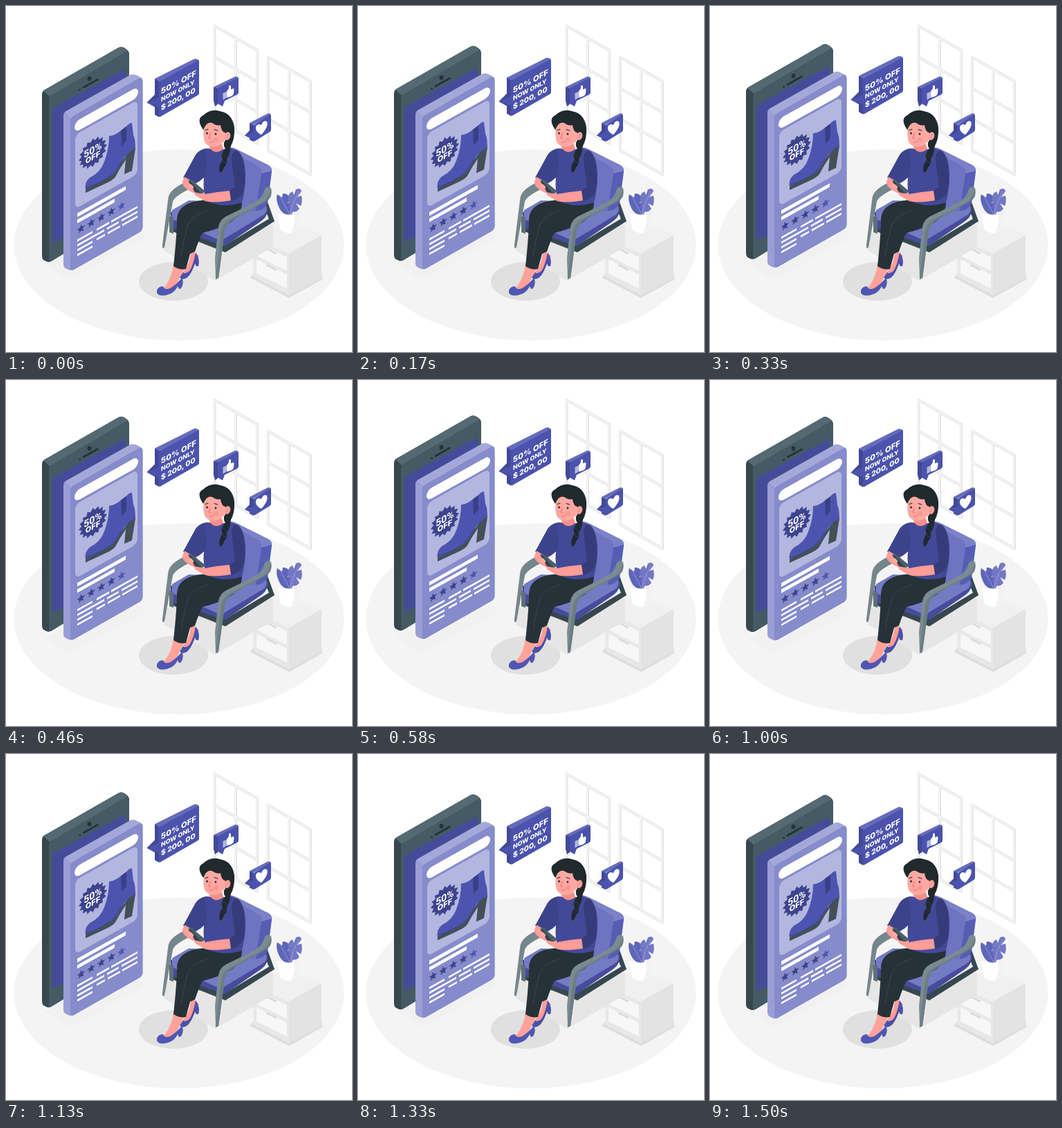
Write an HTML page that moves like this. It is 500 px wide and 500 px high and loops after 1.54 s.

```html
<!DOCTYPE html>
<html lang="en">
<head>
<meta charset="utf-8">
<title>Shopping from the armchair</title>
<style>
  html, body { margin: 0; width: 100%; height: 100%; overflow: hidden; background: #fff; }
  svg { display: block; width: 100vw; height: 100vh; }
  text { font-family: Inter, "Open Sans", sans-serif; font-weight: 800; fill: #fff; }
  .tall { font-family: Roboto, sans-serif; font-weight: 700; font-stretch: 75%; }
  .line { fill: none; stroke-linecap: round; stroke-linejoin: round; }
  .front { fill: #4c53ad; }
  .side { fill: #424897; }
  .top { fill: #666cbb; }
</style>
</head>
<body>
<svg viewBox="0 0 500 500">
  <!-- room -->
  <ellipse cx="250" cy="345.300" rx="238.500" ry="138" fill="#f4f4f4"/>
  <g id="windows" class="line"></g>
  <path d="M55 372L168 312L204 334L92 396Z" fill="#f1f1f1"/>
  <ellipse cx="242" cy="398" rx="50" ry="28" fill="#e0e0e0"/>

  <!-- cabinet -->
  <path d="M353 393L409 422L457 395V388L409 362L358 386Z" fill="#dedede"/>
  <path d="M357.500 335L403 310L456 331L409 358Z" fill="#f0f0f0"/>
  <path d="M357.500 335L409 358V418L357.500 391Z" fill="#e8e8e8"/>
  <path d="M409 358L456 331V392L409 418Z" fill="#e3e3e3"/>
  <path d="M362 341.500L406 363V383L362 361ZM362 366L406 388V408L362 386.500Z" fill="#f7f7f7"/>
  <path class="line" d="M377 351L390 357.500M377 374.500L390 381" stroke="#dcdcdc" stroke-width="2.600"/>

  <!-- plant -->
  <path d="M410 303Q399 301 395 292Q389 280 392 272L399 277L400 271Q408 270 411 280L406 285L414 282Q417 294 412 303Z" fill="#5f65b9"/>
  <path d="M410 303Q411 290 408 282Q406 271 414 268L416 273L419 265Q426 262 427 268L421 276L427 274Q429 283 426 289L419 285L424 293Q419 299 415 297Q412 299 412 303Z" fill="#7378c4"/>
  <path class="line" d="M410 301L397 277M411 301Q413 285 424 268" stroke="#a3a6da" stroke-width=".8"/>
  <path d="M392.500 298Q409 306 425.500 298L422 323Q409 333 396 323Z" fill="#fff"/>
  <path d="M417 301Q422 300 425.500 298L422 323Q418 327 412 328Q418 316 417 301Z" fill="#f2f2f2"/>
  <path class="line" d="M392.500 298Q409 306 425.500 298" stroke="#ececec" stroke-width="1"/>

  <!-- armchair -->
  <path d="M232 330L228 353L302 397L386 348V316L300 300Z" fill="#e6e6e6"/>
  <path d="M236 313L316 346L384 305L388 311L317 356L236 324Z" fill="#37474f"/>
  <path d="M368 277L375 275L388 311L382 313Z" fill="#37474f"/>
  <path d="M238 298L262 285L378 290Q380 302 370 310L316 347L237 320Z" fill="#464c9b"/>
  <path d="M240 295L264 281L374 284Q380 296 372 302L316 336Q310 339 303 336L240 308Z" fill="#757ac5"/>
  <path d="M316 206Q324 202 333 207L379 230Q385 233 384 240L378 286Q372 296 360 296L330 292Z" fill="#575db3"/>
  <path d="M318 206L363 231Q370 235 369 243L361 296L330 292Z" fill="#6f74c1"/>
  <path d="M326 205L333 207L379 230Q384 233 384 238L369 242Q370 235 363 231L324 209Z" fill="#7c81c9"/>
  <path d="M261 254Q237 264 234.500 277L226 345V350L229 349L241 283Q243 275 266 264Z" fill="#75858c"/>
  <path d="M236 304L242 306V329L236 327Z" fill="#5f7078"/>

  <!-- legs -->
  <path d="M268 353L279 361L276 370Q268 384 258 391L254 387Q264 376 266 363Z" fill="#ff9c98"/>
  <path d="M274 356Q281 366 278 376H275L273 372Q268 388 261 393Q254 397 251 392L256 385Q259 388 265 383Q271 374 274 356Z" fill="#4a51aa"/>
  <path d="M242 373L258 379L248 399Q240 412 229 411Q222 410 230 405Q240 391 242 373Z" fill="#ffa29c"/>
  <path d="M254 393Q258 400 253 408L250 409L248 405Q242 418 225 418.500Q217 418 218 411Q220 405 227 405Q229 411 237 408Q247 402 254 393Z" fill="#4f56b2"/>
  <path d="M270 283Q247 290 247 309Q247 330 242 376Q251 382 260 380L266 358L273 355Q278 339 284 328Q296 325 312 319Q342 307 341 282L300 278Z" fill="#263238"/>
  <path class="line" d="M292 296Q266 303 262 319Q256 342 253 361" stroke="#3a464d" stroke-width="1"/>

  <!-- upper body -->
  <path d="M293 196L312 200L315 209Q304 222 295 209Z" fill="#f58f8b"/>
  <path d="M288 206Q292 205 296 207Q303 215 314 207Q328 204 337 211Q347 223 346 250Q345 270 341 284Q316 293 290 282Q284 268 286 248Z" fill="#434996"/>
  <path d="M288 206Q279 208 274 215L262 237L256 248L273 257Q281 253 287 247Q292 236 289 222Z" fill="#3d438b"/>
  <path d="M326 222Q326 207 336 210Q347 222 345 260Q343 276 326 282Q321 278 322 267L331 262Z" fill="#363b7a"/>
  <path d="M258 247L272 255Q267 260 275 264L282 270Q276 274 269 269Q254 262 255 254Z" fill="#ff9d98"/>
  <path d="M323 267L325 281Q300 285 288 282L274 274Q270 269 276 268L288 272Q298 270 305 269Z" fill="#ff9d98"/>
  <path d="M263.500 253Q265 250 269 252L287 267Q287 271 282 271L273 269Z" fill="#4c5f68"/>
  <path d="M263.500 253L273 269L282 271L279 268L268 255Z" fill="#33434b"/>
  <ellipse cx="267" cy="261" rx="4.500" ry="3" transform="rotate(40 267 261)" fill="#ffa9a2"/>
  <path d="M317 206Q309 214 313 222Q306 232 309 241Q314 239 315 233Q320 228 319 221Q325 212 325 196L317 194Z" fill="#20292e"/>
  <path class="line" d="M313 213L319 218M312 224L317 227" stroke="#39454b" stroke-width=".9"/>

  <!-- head -->
  <path d="M286 171Q284 191 288 198Q296 207 307 202Q316 198 320 186L318 168Q300 160 286 171Z" fill="#ffa8a1"/>
  <path d="M282 174Q276 162 285 158Q296 148 309 152Q327 155 330 175Q331 193 324 204L316 205Q313 199 317 194L317 183Q311 182 310 172Q305 174 298 169Q290 166 285 179Z" fill="#20292e"/>
  <ellipse cx="320" cy="188" rx="4.200" ry="6" transform="rotate(14 320 188)" fill="#ffa29c"/>
  <path class="line" d="M319 190Q320 185 323 186" stroke="#e47c79" stroke-width=".8"/>
  <circle cx="290.500" cy="184" r="1.400" fill="#20292e"/>
  <circle cx="303" cy="185" r="1.400" fill="#20292e"/>
  <path class="line" d="M288 179.500L292 178M301 178.500L306 180" stroke="#20292e" stroke-width="1.100"/>
  <path class="line" d="M295.500 184L293 191L296 192M294 197Q298 198 300 195" stroke="#d96763" stroke-width=".9"/>
  <circle cx="304" cy="193" r="3.300" fill="#f98a87" opacity=".65"/>

  <path d="M374 264Q379 259 383 263Q386 277 376 282L328 309Q318 315 316 326L307 393L303 395L302 364L307 319Q309 309 318 304L359 284Q371 277 374 264Z" fill="#7b8b92"/>
  <path d="M316 326L307 393L303 395L311 326Q312 315 322 309L368 285Q380 279 383 264Q385 277 376 282L328 309Q318 315 316 326Z" fill="#6c7d85"/>

  <!-- small bubbles -->
  <path class="top" d="M300 117L331 102Q335 101.500 336 104L306 120Z"/>
  <path class="side" d="M300 117L306 119V142L302 145L300 137Z"/>
  <path class="front" d="M306 119L334 104Q336 103 336 106V125Q336 127 334 128L316 137L313 145L306 141Z"/>
  <path d="M313.500 126L318 124V133L313.500 135.500Z" fill="#b7badf"/>
  <path d="M318.500 124L322 119V115.500Q325 113 325 117V120.500L329 119Q330 122 328.500 128Q326 131 318.500 132.500Z" fill="#fff"/>
  <path class="top" d="M352 169L378 155.500Q382 154.500 383 157L357 172Z"/>
  <path class="side" d="M352 169L358 172V196L352 193V190L345 187L352 180Z"/>
  <path class="front" d="M358 172L381 157Q383 156 383 159V179Q383 181 381 182L360 195Q358 196 358 194L353 191L345 187L358 182Z"/>
  <path d="M369 186Q360 182 361 175Q363 169 369 172Q372 164 377 167Q380 174 369 186Z" fill="#fff"/>

  <!-- floating phone, offer card and price bubble -->
  <g id="float">
    <path d="M52 128Q52 123 56 121L162 60.500Q166 58 170 60L174 62.500Q178 65 178 70V300L66 368.500Q62 371 58 369L54 367Q52 365 52 361Z" fill="#37474f"/>
    <path d="M54 122.500L162 60.500Q166 58 170 60L174 62.500L176.500 65L63 131Z" fill="#546972"/>
    <path d="M62 136Q62 131 66 129L172 67Q178 64 178 71V300L66 368.500Q62 371 62 366Z" fill="#455a64"/>
    <path d="M67 152Q67 148 70 146L170 92Q173 91 173 94V290L67 343Z" fill="#464b99"/>
    <path class="line" d="M112 117.500L132.500 106" stroke="#263238" stroke-width="2.800"/>
    <ellipse cx="120.500" cy="105" rx="2.900" ry="3.300" fill="#263238"/>
    <circle cx="106.700" cy="121" r="1.400" fill="#263238"/>

    <path d="M83 158Q83 154 87 152L180 99.500Q184 98 188 100L194 103Q197.500 105 197.500 109V319Q197.500 324 193 327L98 381Q94 383 90 381L86 379Q83 377 83 373Z" fill="#999ed5"/>
    <path d="M85 153L180 99.500Q184 98 188 100L194 103L196.500 106L94 162Z" fill="#a4a8d9"/>
    <path d="M93 165Q93 161 97 159L192 104.500Q197.500 102 197.500 109V319Q197.500 324 193 327L98 381Q93 383 93 377Z" fill="#868bcb"/>
    <g id="card" transform="matrix(1 -.56 0 1 93 160)">
      <rect x="6" y="11" width="92" height="15.500" rx="7.700" fill="#fff"/>
      <rect x="7" y="30" width="90" height="107" rx="7" fill="#b3b6de"/>
      <g id="badge" transform="translate(32.500 70)">
        <text class="tall" y="1" text-anchor="middle" font-size="14">50%</text>
        <text y="10.500" text-anchor="middle" font-size="11">OFF</text>
      </g>
    </g>
    <path d="M115 262L147 244L171 220L186 198L187 206L182 238L171 243L173 222Q164 235 158 247Q154 252 145 256L115 270Z" fill="#435058"/>
    <path d="M149 188Q158 187 166 180L174 174Q178 169 182 169L184 186Q188 196 186 206Q175 212 167 225Q159 243 146 249L115 265Q113 255 121 248Q137 240 142 225Q149 207 149 188Z" fill="#4d54b0"/>
    <path d="M166 180L174 174L174 195L167 203Z" fill="#3a4087"/>
    <path class="line" d="M115 262Q126 261 145 249Q157 242 166 225" stroke="#3d438d" stroke-width="1"/>

    <path class="top" d="M215 105L272 76.500Q275 75.500 279 78.500L221 111Z"/>
    <path class="side" d="M215 105L221 109V160.500L215 157V146L203.500 139.500L215 128Z"/>
    <path class="front" d="M221 109.500L277 79Q279 78 279 80V126Q279 128 277 129L223 160Q221 161 221 159V146L204 140L221 132Z"/>
    <g transform="matrix(1 -.53 0 1 224 127.500)">
      <text y="0" font-size="11.300">50% OFF</text>
      <text y="10.800" font-size="8.800">NOW ONLY</text>
      <text y="23.500" font-size="10.400">$ 200, 00</text>
    </g>
  </g>
</svg>
<script>
const $ = id => document.getElementById(id);

function add(parent, tag, attrs, first) {
  const el = document.createElementNS('http://www.w3.org/2000/svg', tag);
  for (const key in attrs) el.setAttribute(key, attrs[key]);
  parent.insertBefore(el, first ? parent.firstChild : null);
}

function spiky(cx, cy, tips, outer, inner) {
  let d = '';
  for (let i = 0; i < tips * 2; i++) {
    const a = Math.PI * i / tips - Math.PI / 2, r = i % 2 ? inner : outer;
    d += (i ? 'L' : 'M') + (cx + r * Math.cos(a)).toFixed(2) + ' ' + (cy + r * Math.sin(a)).toFixed(2);
  }
  return d + 'Z';
}

function pane(x, y) {
  const bars = [45, 89].map(h => `M${x} ${y + h}l61.500 35`).join('');
  const d = `M${x} ${y}l61.500 35v134.500l-61.500 -35zM${x + 30.7} ${y + 17.5}v134.500${bars}`;
  add($('windows'), 'path', { d, stroke: '#e3e3e3', 'stroke-width': 3.8 });
  add($('windows'), 'path', { d, stroke: '#f8f8f8', 'stroke-width': 1.6, transform: 'translate(-.5 -.3)' });
}
pane(301.5, 29);
pane(378.5, 74);

add($('badge'), 'path', { d: spiky(0, 0, 16, 20.5, 16.5), fill: '#3d438d' }, true);

const bar = (x1, x2, y, h) =>
  add($('card'), 'rect', { x: x1, y: y - h / 2, width: x2 - x1, height: h, fill: '#fff' });
bar(10, 80, 147.7, 5.4);
bar(10, 64, 156.8, 5.2);

for (let i = 0; i < 5; i++)
  add($('card'), 'path', { d: spiky(15.5 + i * 14.6, 170.5, 5, 6.2, 2.7), fill: i < 4 ? '#3d438d' : '#4f56b2' });

[
  [[10, 32], [38, 56], [59, 97]],
  [[10, 49], [53, 70], [74, 97]],
  [[10, 32], [38, 50], [54, 72], [75, 97]],
  [[10, 32]]
].forEach((row, i) => row.forEach(([a, b]) => bar(a, b, 184.5 + i * 7, 2.8)));

// gentle hover: highest at PEAK, one swing per loop
const LOOP = 1540, PEAK = 720, RISE = 8.6;
function tick() {
  const phase = 2 * Math.PI * (performance.now() % LOOP - PEAK) / LOOP;
  const y = 0.2 - RISE * (1 + Math.cos(phase)) / 2;
  $('float').setAttribute('transform', `translate(0 ${y.toFixed(2)})`);
  requestAnimationFrame(tick);
}
tick();
</script>
</body>
</html>
```
